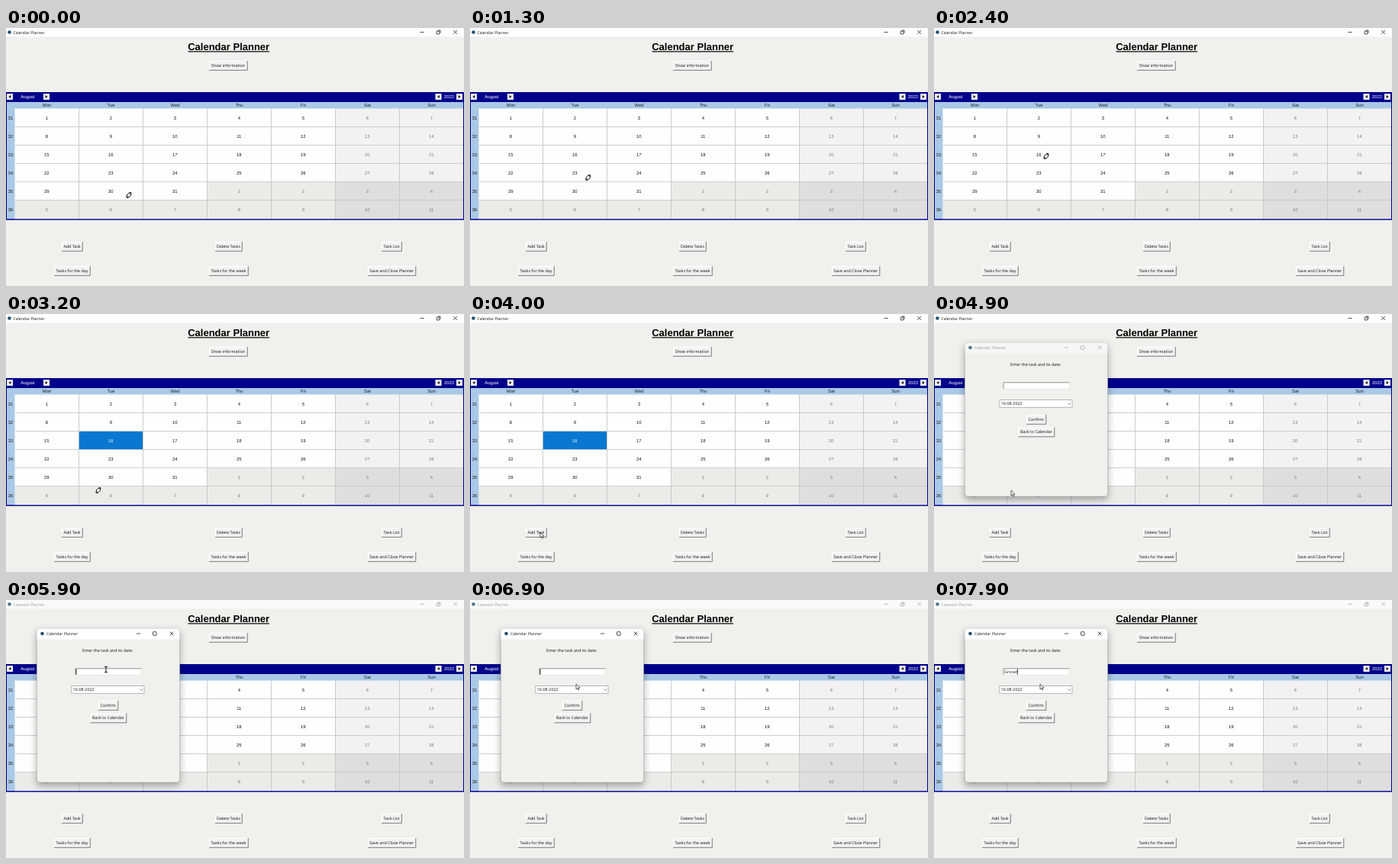
An HTML page for the animation above (8 s loop, 600 by 338 pixels).

```html
<!DOCTYPE html>
<html lang="en">
<head>
<meta charset="utf-8">
<title>Calendar Planner</title>
<style>
  html, body { margin: 0; width: 100%; height: 100%; overflow: hidden; background: #f0f0ef; }
  svg { display: block; width: 600px; height: 338px; }
  text { font: 5.35px "Open Sans", "Noto Sans", sans-serif; text-rendering: geometricPrecision; white-space: pre; }
  .cal { font: 5.9px "Liberation Sans", Arial, sans-serif; }
  .mid { text-anchor: middle; }
  .bar { font-size: 5.1px; }
  .head { font: bold 13px "Liberation Sans", Arial, sans-serif; }
  #dialog { filter: drop-shadow(0 4px 5px rgba(0, 0, 0, .32)); }
</style>
</head>
<body>
<svg id="stage" viewBox="0 0 600 338"></svg>
<script>
const LOOP = 8000;
const NS = 'http://www.w3.org/2000/svg';
const stage = document.getElementById('stage');

function el(parent, tag, attrs = {}, text) {
  const node = document.createElementNS(NS, tag);
  for (const key in attrs) node.setAttribute(key, attrs[key]);
  if (text !== undefined) node.textContent = text;
  return parent.appendChild(node);
}
const rect = (p, x, y, width, height, fill, more) => el(p, 'rect', { x, y, width, height, fill, ...more });
const line = (p, d, stroke, width = 1) => el(p, 'path', { d, stroke, 'stroke-width': width, fill: 'none' });
const label = (p, x, y, text, cls = '', fill = '#111') => el(p, 'text', { x, y, class: cls, fill }, text);

function button(p, x, y, w, text, h = 12) {
  const g = el(p, 'g');
  rect(g, x, y, w, h, '#f2f2f2');
  line(g, `M${x + .5} ${y + h}V${y + .5}H${x + w}`, '#fff');
  line(g, `M${x} ${y + h + .3}H${x + w + .3}V${y}`, '#6e6e6e', .9);
  label(g, x + w / 2, y + h / 2 + 1.9, text, 'mid');
  return g;
}

// Title bar with a plain icon; returns the parts that change with focus.
function titleBar(p, x, y, textX, min, max, close, restored) {
  const icon = el(p, 'circle', { cx: x, cy: y, r: 2.3, fill: '#23506f' });
  const name = label(p, textX, y + 2, 'Calendar Planner', 'bar');
  const marks = el(p, 'g', { stroke: '#222', fill: 'none', 'stroke-width': .8 });
  el(marks, 'path', { d: `M${min - 2.5} ${y}h5M${close - 2.4} ${y - 2.4}l4.8 4.8m0-4.8l-4.8 4.8` });
  if (restored) {
    el(marks, 'path', { d: `M${max - 2.3} ${y - 1.3}h3.6v3.7h-3.6zM${max - 1} ${y - 2.4}h3.5v3.6` });
  } else {
    el(marks, 'rect', { x: max - 2.3, y: y - 2.3, width: 4.6, height: 4.6, rx: .6 });
  }
  return active => {
    name.setAttribute('fill', active ? '#111' : '#999');
    marks.setAttribute('stroke', active ? '#222' : '#aaa');
    icon.setAttribute('opacity', active ? 1 : .8);
  };
}

// Main window
rect(stage, 0, 0, 600, 338, '#f0f0ef');
const mainBar = rect(stage, 0, 0, 600, 11.5, '#fff');
const mainFocus = titleBar(stage, 4.5, 5.5, 9.5, 545, 566.5, 588.5, true);
label(stage, 291.7, 28.5, 'Calendar Planner', 'head mid', '#000');
rect(stage, 238.5, 30.3, 106.5, 1.2, '#000');

button(stage, 266, 43, 50, 'Show information');
const addButton = button(stage, 73, 280, 27, 'Add Task');
button(stage, 274, 280, 35, 'Delete Tasks');
button(stage, 492, 280, 26, 'Task List');
button(stage, 63, 312, 47, 'Tasks for the day');
button(stage, 266, 312, 51, 'Tasks for the week');
button(stage, 474, 312, 62.5, 'Save and Close Planner');

// Calendar
const COL = 84, ROW = 24.1, LEFT = 11.5, TOP = 105.5;
rect(stage, 0, 84, 600, 167.5, '#00008b');
rect(stage, 1, 97, 598, 153, '#a9c9e6');
label(stage, 28.5, 92.2, 'August', 'cal mid', '#fff');
label(stage, 580.5, 92.2, '2022', 'cal mid', '#fff');
[[5, -1], [53, 1], [566.5, -1], [594, 1]].forEach(([x, dir]) => {
  rect(stage, x - 4, 86, 8, 8, '#f2f2f2');
  el(stage, 'path', { d: `M${x + dir * 1.5} 90l${-dir * 2.8} -2v4z`, fill: '#000' });
});
['Mon', 'Tue', 'Wed', 'Thu', 'Fri', 'Sat', 'Sun'].forEach((day, i) =>
  label(stage, 53.5 + i * COL, 103, day, 'cal mid', '#222'));

let picked, pickedText;
for (let r = 0; r < 6; r++) {
  const y = TOP + r * ROW;
  const textY = y + 14.1;
  label(stage, 6, textY + .2, 31 + r, 'cal mid', '#222');
  for (let c = 0; c < 7; c++) {
    const n = r * 7 + c + 1;
    const other = n > 31, weekend = c > 4;
    const fill = other ? (weekend ? '#dedede' : '#ebebea') : (weekend ? '#f2f2f2' : '#fefefe');
    const x = LEFT + c * COL;
    const cell = rect(stage, x, y, c === 6 ? 83.5 : COL, ROW, fill);
    const text = label(stage, x + 41.8, textY, other ? n - 31 : n, 'cal mid', other || weekend ? '#7c7c7c' : '#111');
    if (n === 16) { picked = cell; pickedText = text; }
  }
}
for (let r = 1; r < 6; r++) line(stage, `M12 ${Math.round(TOP + r * ROW) - .5}H599`, '#c4c4c4', .8);
for (let c = 1; c < 7; c++) line(stage, `M${LEFT + c * COL} 105.5V250`, '#c4c4c4', .8);

// Task dialog
const dialog = el(stage, 'g', { id: 'dialog' });
rect(dialog, 40.3, 37.3, 187.4, 201.7, '#f0f0ef', { rx: 4, stroke: '#9b9b9b', 'stroke-width': .6 });
const dialogBar = el(dialog, 'path', { d: 'M40.6 51.5V41.3q0-3.7 3.7-3.7H223.7q3.7 0 3.7 3.7V51.5z' });
const dialogFocus = titleBar(dialog, 47.5, 44, 53, 173.5, 194.8, 217, false);
const form = el(dialog, 'g');
label(form, 133.3, 68, 'Enter the task and its date:', 'mid');
rect(form, 91, 89.5, 86.5, 8.7, '#fff');
line(form, 'M91 98.3V89.8H177.5', '#777', .8);
line(form, 'M91 98.3H177.6V89.8', '#dadada', .6);
rect(form, 86, 112.4, 95, 9.8, '#fff', { stroke: '#8a8a8a', 'stroke-width': .6 });
label(form, 87.7, 119.3, '16-08-2022');
line(form, 'M175.6 116.7l1.7 1.7l1.7-1.7', '#555', .7);
button(form, 121, 132, 25.5, 'Confirm');
button(form, 110.5, 148.5, 47, 'Back to Calendar');
const entry = label(form, 92, 95.8, '');
const caret = rect(form, 91.6, 90.5, .9, 7, '#000');

// Pointers, each drawn around its own hot spot
const pointers = {
  exchange: el(stage, 'g', { fill: 'none', stroke: '#000', 'stroke-width': 1 }),
  arrow: el(stage, 'g'),
  beam: el(stage, 'g')
};
el(pointers.exchange, 'path', { d: 'M-2.2 2C-3.4-.6-.6-3.4 2-2.8M2.4-1.8C3.2.6.8 3.2-1.6 2.6', stroke: '#fff', 'stroke-width': 2.4 });
el(pointers.exchange, 'path', { d: 'M-2.2 2C-3.4-.6-.6-3.4 2-2.8M2.4-1.8C3.2.6.8 3.2-1.6 2.6' });
el(pointers.exchange, 'path', { d: 'M.6-3.4L3-3.2L2.6-1M-3 1.2L-2.8 3.4L-.6 3.2' });
el(pointers.arrow, 'path', { d: 'M0 0V7L1.6 5.6L2.7 8L3.8 7.5L2.8 5.1H5z', fill: '#fff', stroke: '#222', 'stroke-width': .7 });
line(pointers.beam, 'M-2-3.6H2M-2 3.6H2M0-3.6V3.6', '#000', .9);

// Pointer stops: time, x, y
const path = [
  [0, 161, 219], [600, 161, 219], [2100, 147, 168], [2700, 147, 168],
  [3200, 121, 231], [3800, 92, 286], [4500, 92, 286],
  [4900, 101, 231], [5400, 131, 91], [6300, 131, 91], [6800, 139, 110], [8000, 139, 110]
];
const PICK = 2700, PRESS = 4100, OPEN = 4400, READY = 4600, FOCUS = 5600, TYPE = 6950, KEY = 160;

function pointerAt(t) {
  const i = Math.max(1, path.findIndex(p => p[0] > t));
  const [t0, x0, y0] = path[i - 1], [t1, x1, y1] = path[i];
  const k = (t - t0) / (t1 - t0), e = k * k * (3 - 2 * k);
  return [x0 + (x1 - x0) * e, y0 + (y1 - y0) * e];
}

function pointerKind(t, x, y) {
  if (t < OPEN) return y > 84 && y < 251 ? 'exchange' : 'arrow';
  return x > 91 && x < 178 && y > 89 && y < 98.5 ? 'beam' : 'arrow';
}

const show = (node, on) => node.setAttribute('visibility', on ? 'inherit' : 'hidden');

function draw(t) {
  const selected = t >= PICK, focused = t >= FOCUS;
  picked.setAttribute('fill', selected ? '#0a78d0' : '#fefefe');
  pickedText.setAttribute('fill', selected ? '#fff' : '#111');
  addButton.setAttribute('transform', t >= PRESS && t < PRESS + 200 ? 'translate(.4 .4)' : '');

  mainFocus(!focused);
  dialogFocus(focused);
  mainBar.setAttribute('fill', focused ? '#fafafa' : '#fff');
  dialogBar.setAttribute('fill', focused ? '#fff' : '#f6f6f6');

  show(dialog, t >= OPEN);
  show(form, t >= READY);
  const k = Math.min(1, Math.max(0, (t - OPEN) / (READY - OPEN)));
  const e = 1 - (1 - k) ** 2;
  const s = .874 + .126 * e;
  dialog.setAttribute('transform', `translate(${44 - 4 * e} ${44 - 7 * e}) scale(${s}) translate(-40 -37)`);
  dialog.setAttribute('opacity', .19 + .81 * e);

  const typed = 'Grocer'.slice(0, Math.max(0, Math.floor((t - TYPE) / KEY) + 1));
  if (entry.textContent !== typed) entry.textContent = typed;
  caret.setAttribute('x', 91.6 + (typed ? entry.getComputedTextLength() + .3 : 0));
  show(caret, focused && (typed || (t - FOCUS) % 900 < 600));
  if (!focused || t < READY) show(caret, false);

  const [x, y] = pointerAt(t);
  const kind = pointerKind(t, x, y);
  for (const name in pointers) show(pointers[name], name === kind);
  pointers[kind].setAttribute('transform', `translate(${x} ${y})`);
}

const start = performance.now();
function tick() {
  const t = (performance.now() - start) % LOOP;
  draw(Math.floor(t / 100) * 100);
  requestAnimationFrame(tick);
}
tick();
</script>
</body>
</html>
```
